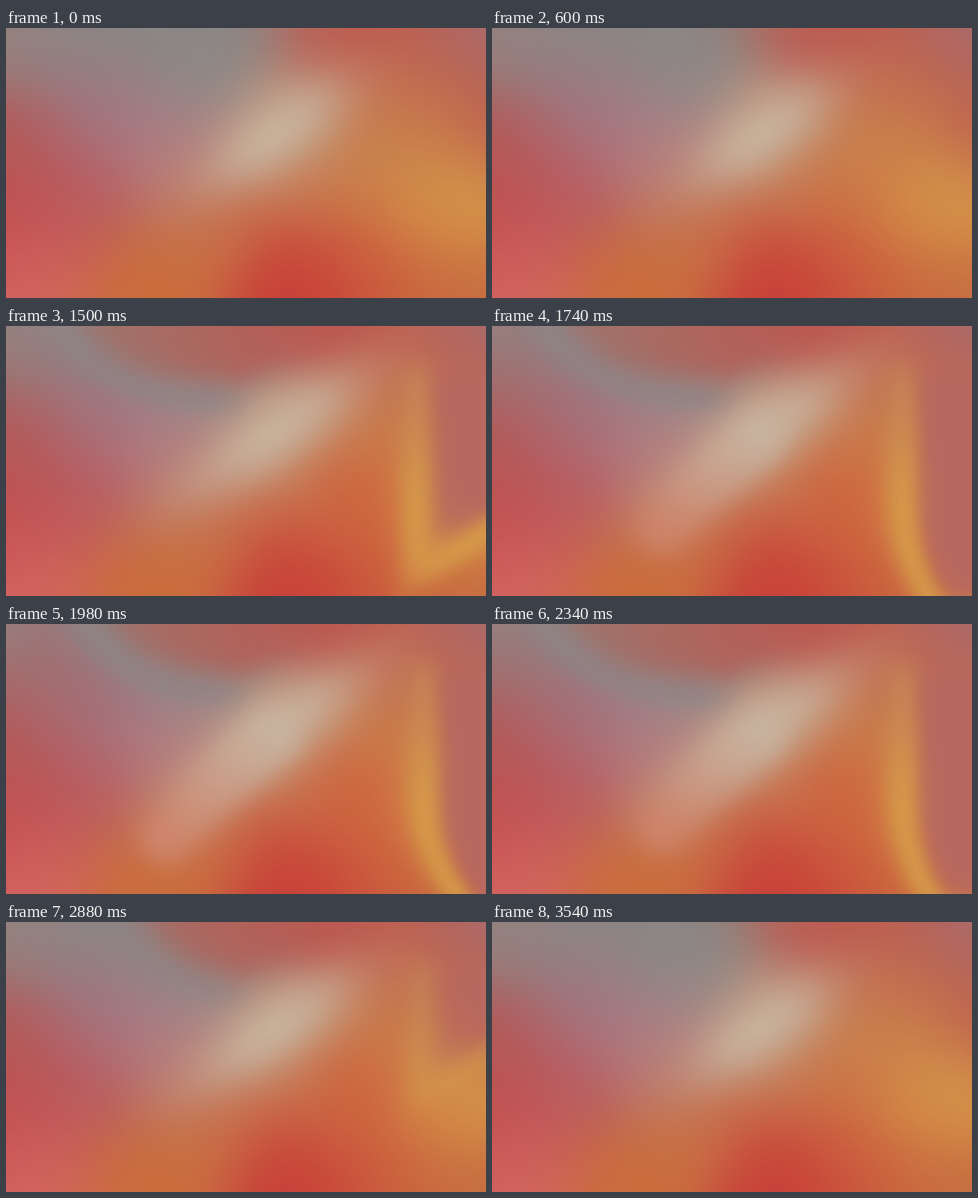
Write an HTML page with a canvas that moves like this. It is 480 px wide and 270 px high and loops after 4080 ms.

```html
<!DOCTYPE html>
<html lang="en">
<head>
<meta charset="utf-8">
<title>Flowing gradient</title>
<style>
  html, body { margin: 0; width: 100%; height: 100%; overflow: hidden; background: #c07060; }
  canvas { display: block; width: 100vw; height: 100vh; }
</style>
</head>
<body>
<canvas id="view" width="160" height="90"></canvas>
<script>
const LOOP = 4080, MID = LOOP / 2, REST = 720, SCALE = 3, SPREAD = 44;
const canvas = document.getElementById('view');
const ctx = canvas.getContext('2d');
const W = canvas.width, H = canvas.height;
const image = ctx.createImageData(W, H);

const clamp = (v, lo = 0, hi = 1) => Math.min(hi, Math.max(lo, v));
const mix = (a, b, t) => a + (b - a) * t;
const ramp = (v, from, to) => { const t = clamp((v - from) / (to - from)); return t * t * (3 - 2 * t); };
const sigmoid = v => 1 / (1 + Math.exp(-v));
const bell = v => Math.exp(-v * v);
const softMin = (a, b, s) => Math.min(a, b) - s * Math.log(1 + Math.exp(-Math.abs(a - b) / s));
const parse = hex => hex.match(/\w\w/g).map(v => parseInt(v, 16));
const px = i => (i % W + 0.5) * SCALE;
const py = i => (Math.floor(i / W) + 0.5) * SCALE;

// Resting gradient: a few colour anchors blended by distance.
const anchors = [
  [0, 0, '#94827f'], [90, 10, '#898685'], [180, 40, '#8a8987'], [215, -10, '#8a8583'],
  [330, 0, '#bb5c52'], [405, 10, '#bd584e'], [480, 0, '#a36f75'], [480, 75, '#bf5f4c'],
  [400, 75, '#c57a4f'], [280, 100, '#bf9c85'], [95, 85, '#a47480'], [170, 125, '#b58086'],
  [0, 120, '#b25a58'], [0, 190, '#c44a4a'], [75, 170, '#b95a60'], [25, 250, '#d56763'],
  [130, 255, '#ca6d39'], [205, 195, '#c87246'], [290, 250, '#c83c38'], [325, 160, '#c87848'],
  [370, 240, '#cb563c'], [430, 178, '#d99d49'], [400, 130, '#cb8248'], [440, 265, '#c66c40']
].map(([x, y, hex]) => ({ x, y, rgb: parse(hex) }));

const base = new Float32Array(W * H * 3);
for (let i = 0; i < W * H; i++) {
  const sum = [0, 0, 0];
  let total = 0;
  for (const { x, y, rgb } of anchors) {
    const w = Math.exp(-((px(i) - x) ** 2 + (py(i) - y) ** 2) / (2 * SPREAD ** 2));
    total += w;
    rgb.forEach((v, k) => sum[k] += w * v);
  }
  base.set(sum.map(v => v / total), i * 3);
}

// The flow runs out to MID and mirrors back, in 60 ms steps with holds at both ends.
function hold(t) {
  if (t < 360) return 0;
  if (t < 600) return 360;
  if (t < 780) return 600;
  if (t < 3360) return Math.floor(t / 60) * 60;
  return t < 3540 ? 3360 : 3540;
}

function poseAt(time) {
  const m = MID - Math.abs(time - MID);
  const early = clamp(m / 540), q = clamp((m - REST) / (MID - REST));
  const left = clamp(1 - q / 0.6), late = ramp(q, 0.75, 1), pour = ramp(q, 0.55, 0.85);
  return {
    top: { x: 67 + 173 * left ** 1.1 + 30 * late + 25 * (1 - early), depth: 74 - 12 * q,
      soft: mix(13, 8, ramp(q, 0, 0.6)), alpha: mix(0.6 * early, 1, ramp(q, 0, 0.3)) },
    right: { x: 428 + 17 * left + 8 * late, bend: 30 * ramp(q, 0.6, 0.85), tip: 95 + 340 * q * q,
      soft: mix(14, 5, ramp(q, 0, 0.7)), alpha: ramp(q, 0.1, 0.4) },
    streak: { x: mix(225, 162, pour), y: mix(150, 212, pour), alpha: 0.8 * pour },
    reach: mix(80, 108, ramp(q, 0, 0.8)),
    band: 0.6 * ramp(q, 0.1, 0.5),
    pink: 0.75 * ramp(q, 0.4, 1),
    ridge: 0.85 * ramp(q, 0, 0.5),
    glow: 0.5 * early * ramp(q, -0.2, 0.4)
  };
}

function render(time) {
  const { top, right, streak, reach, band, pink, ridge, glow } = poseAt(time);
  const sx = 265, sy = 112, vx = streak.x - sx, vy = streak.y - sy, vv = vx * vx + vy * vy;
  const tilt = -0.6, cos = Math.cos(tilt), sin = Math.sin(tilt), len = 45;
  let r, g, b;
  const blend = (cr, cg, cb, a) => { r += (cr - r) * a; g += (cg - g) * a; b += (cb - b) * a; };

  for (let i = 0; i < W * H; i++) {
    const x = px(i), y = py(i);
    [r, g, b] = base.subarray(i * 3, i * 3 + 3);

    // red glow rising from below
    blend(206, 88, 58, glow * bell(Math.hypot(x - 350, y - 170) / 62));

    // slanted cream light
    const dx = x - 268, dy = y - 107;
    const light = bell(Math.hypot((dx * cos + dy * sin) / reach, (dy * cos - dx * sin) / 33));
    blend(201, 181, 160, 0.85 * light);

    // cream pouring down to the left
    const u = clamp(((x - sx) * vx + (y - sy) * vy) / vv);
    const dist = Math.hypot(x - sx - vx * u, y - sy - vy * u);
    blend(mix(199, 208, u), mix(178, 138, u), mix(159, 115, u),
      streak.alpha * Math.exp(-((dist / 30) ** 2.6)));

    // orange to yellow ridge, then the mauve flow on the right
    const edge = x - right.x - right.bend * Math.max(0, (y - 170) / 95) ** 2.2;
    const e = softMin(edge, right.tip - 0.6 * (x - 440) - y, 16);
    const f = ramp(y, 50, 195);
    blend(mix(198, 214, f), mix(132, 156, f), mix(86, 73, f),
      ridge * bell((e + 17) / 19) * ramp(y, 18, 68));
    blend(184, 104, 95, right.alpha * sigmoid(e / right.soft) * ramp(y, 8, 70));

    // red flow along the top, with its pink and grey rims
    const k = Math.exp(-Math.max(-1.5, (x - top.x) / len));
    const lift = Math.min(46, 0.42 * Math.max(0, x - 235));
    const d = (top.depth * (1 - k) - lift - y) / Math.hypot(1, top.depth / len * k);
    blend(172, 98, 103, pink * sigmoid((-d - 28) / 9) * bell(y / 95)
      * (1 - ramp(x, 70, 160)) * (1 - 0.6 * bell(Math.hypot(x, y) / 35)));
    blend(140, 134, 136, band * bell((d + 8) / 15) * (1 - ramp(x, 200, 255)));
    const h = clamp((x - 100) / 220);
    blend(mix(160, 187, h), mix(114, 88, h), mix(106, 80, h),
      top.alpha * sigmoid((d - 9) / (top.soft + 0.05 * Math.max(0, x - 240))) * (1 - ramp(x, 330, 410)));

    image.data.set([r, g, b, 255], i * 4);
  }
  ctx.putImageData(image, 0, 0);
}

let shown = -1;
const start = performance.now();
function tick() {
  const time = hold((performance.now() - start) % LOOP);
  if (time !== shown) render(shown = time);
  requestAnimationFrame(tick);
}
tick();
</script>
</body>
</html>
```
